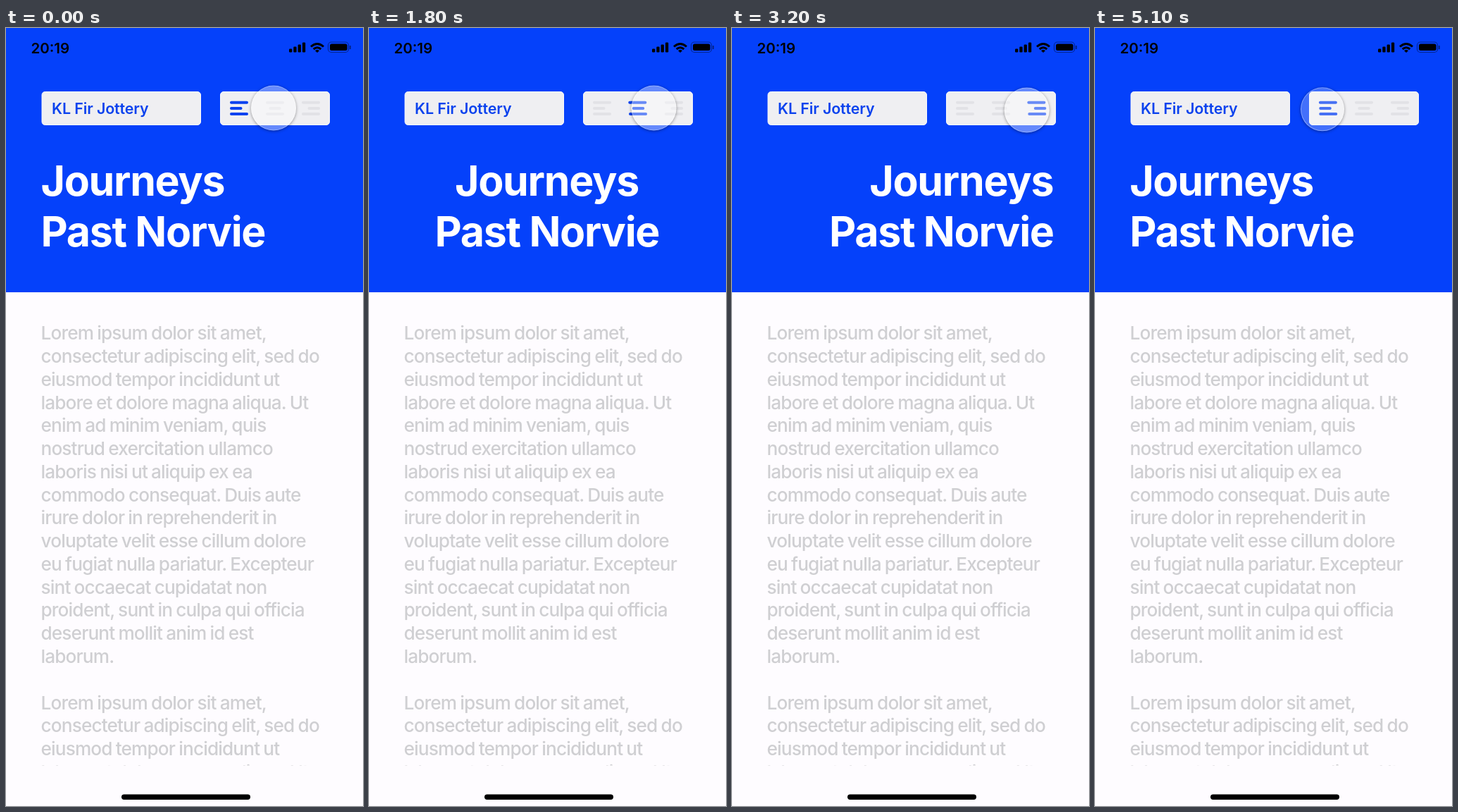
Recreate the animation shown at these times as an HTML page. Size 507x1104 px, loop 5.2 s.

```html
<!DOCTYPE html>
<html lang="en">
<head>
<meta charset="utf-8">
<title>Text alignment</title>
<style>
  html, body { margin: 0; width: 100%; height: 100%; overflow: hidden; background: #fefcff; }
  svg { position: absolute; left: 0; top: 0; }
  text { font-family: Inter, "Open Sans", sans-serif; font-optical-sizing: none; white-space: pre; }
  .title { font-size: 59px; font-weight: 700; letter-spacing: -1.3px; fill: #fff; }
  .label { font-size: 21.4px; font-weight: 600; letter-spacing: -.1px; fill: #0a42ee; }
  .clock { font-size: 20.5px; font-weight: 600; }
  .body { font-size: 26.2px; font-weight: 500; letter-spacing: -.85px; word-spacing: -1px; fill: #cfcfd2; }
  .panel { fill: #efeff2; stroke: #f8f8fc; }
  #lens {
    position: absolute; left: 0; top: 0; box-sizing: border-box; border-radius: 50%;
    border: 1px solid rgba(255, 255, 255, .35); box-shadow: 0 1px 4px rgba(0, 0, 0, .4);
  }
</style>
</head>
<body>
<svg width="507" height="1104" viewBox="0 0 507 1104">
  <clipPath id="panelClip"><rect x="304" y="90" width="156" height="48" rx="5"/></clipPath>
  <clipPath id="bodyClip"><rect y="376" width="507" height="670.5"/></clipPath>
  <rect width="507" height="375" fill="#0541fa"/>

  <text class="clock" x="35.5" y="36">20:19</text>
  <g id="signal"></g>
  <g fill="none" stroke="#000" stroke-width="3">
    <path d="M433 26.5Q442 18.5 451 26.5M436.7 30Q442 25.5 447.3 30"/>
    <path d="M439 32.2Q442 30 445 32.2L442 35Z" fill="#000" stroke="none"/>
    <rect x="457.5" y="20" width="29" height="14.5" rx="4.5" stroke-width="1.2" opacity=".4"/>
    <path d="M488.8 25V30" stroke-width="2" opacity=".45"/>
  </g>
  <rect x="460" y="22.5" width="24.5" height="9.5" rx="2.5"/>

  <rect class="panel" x="51" y="90.5" width="225.5" height="47" rx="4.5"/>
  <text class="label" x="65" y="121.7">KL Fir Jottery</text>
  <rect class="panel" x="304.5" y="90.5" width="155" height="47" rx="4.5"/>
  <g id="icons" clip-path="url(#panelClip)"></g>

  <text class="title" y="238">Journeys</text>
  <text class="title" y="310">Past Norvie</text>

  <g id="body" clip-path="url(#bodyClip)"></g>
  <rect x="164" y="1087.5" width="183" height="7.5" rx="3.7"/>
</svg>
<div id="lens"></div>

<script>
const LOOP = 5200, STEP = 100;
const $ = id => document.getElementById(id);

function add(parent, tag, attrs, text = "") {
  const el = document.createElementNS("http://www.w3.org/2000/svg", tag);
  for (const name in attrs) el.setAttribute(name, attrs[name]);
  el.textContent = text;
  return parent.appendChild(el);
}

for (let i = 0; i < 4; i++) {
  const height = 5 + i * 3;
  add($("signal"), "rect", { x: 402 + i * 6.3, y: 34.5 - height, width: 4.3, height, rx: 1.2 });
}

const lorem = `Lorem ipsum dolor sit amet,
consectetur adipiscing elit, sed do
eiusmod tempor incididunt ut
labore et dolore magna aliqua. Ut
enim ad minim veniam, quis
nostrud exercitation ullamco
laboris nisi ut aliquip ex ea
commodo consequat. Duis aute
irure dolor in reprehenderit in
voluptate velit esse cillum dolore
eu fugiat nulla pariatur. Excepteur
sint occaecat cupidatat non
proident, sunt in culpa qui officia
deserunt mollit anim id est
laborum.`.split("\n");
[...lorem, "", ...lorem.slice(0, 4)].forEach((line, i) =>
  add($("body"), "text", { class: "body", x: 49.5, y: 442.2 + i * 32.77 }, line));

// Position of an item inside a span: 0 = left, 0.5 = centre, 1 = right.
const aligned = (left, right, width, k) => left + (right - left - width) * k;
const barWidths = [26, 17.5, 26];
const barX = (row, k) => aligned(318, 446, barWidths[row], k);
const addBar = (row, k, fill) => add($("icons"), "rect",
  { x: barX(row, k), y: 103.8 + row * 8.1, width: barWidths[row], height: 4, rx: 2, fill });

for (const k of [0, .5, 1]) barWidths.forEach((_, row) => addBar(row, k, "#e2e2e6"));
const bars = barWidths.map((_, row) => addBar(row, 0, "#0a42f0"));
const titles = [...document.querySelectorAll(".title")];
const titleWidths = titles.map(el => el.getComputedTextLength());

// Underdamped spring of unit mass, going from 0 to 1.
function spring(ms, stiffness) {
  if (ms <= 0) return 0;
  const t = ms / 1000, decay = 5, w = Math.sqrt(stiffness - decay * decay);
  return 1 - Math.exp(-decay * t) * (Math.cos(w * t) + decay / w * Math.sin(w * t));
}

const taps = [[950, .5], [2380, .5], [3890, -1]];
const alignment = (t, stiffness) =>
  taps.reduce((sum, [at, delta]) => sum + delta * spring(t - at, stiffness), 0);

// time, x, y, radius
const lensPath = [
  [0, 380, 113.5, 32], [850, 380, 113.5, 32], [950, 380, 113.5, 31],
  [1200, 380, 113.5, 31], [1300, 380, 113.5, 32], [1600, 381, 113.5, 32],
  [1700, 389, 113.5, 32], [1800, 404.5, 113.5, 32], [1950, 424, 115, 32],
  [2100, 437, 117, 32], [2300, 436, 118, 32], [2400, 436, 118, 31],
  [2850, 436, 118, 31], [2950, 435, 118, 32], [3200, 418.7, 116.5, 32],
  [3500, 410, 115, 32], [3600, 323, 115.3, 32], [3800, 323, 115.3, 32],
  [3900, 323, 115.3, 31], [LOOP, 323, 115.3, 31]
];

function lensAt(t) {
  const i = lensPath.findIndex(key => key[0] > t);
  const a = lensPath[i - 1], b = lensPath[i];
  const p = (t - a[0]) / (b[0] - a[0]);
  return a.map((v, n) => v + (b[n] - v) * p).slice(1);
}

const barStiffness = [80, 135, 64], titleStiffness = 100;

function draw() {
  const t = Math.floor((performance.now() % LOOP) / STEP) * STEP;
  bars.forEach((bar, row) => bar.setAttribute("x", barX(row, alignment(t, barStiffness[row]))));
  titles.forEach((el, i) =>
    el.setAttribute("x", aligned(49.5, 457.5, titleWidths[i], alignment(t, titleStiffness))));

  // Pressing makes the lens smaller and clearer.
  const [x, y, r] = lensAt(t), style = $("lens").style;
  style.width = style.height = 2 * r + "px";
  style.transform = `translate(${x - r}px, ${y - r}px)`;
  style.background = `rgba(255, 255, 255, ${.25 + (r - 31) * .14})`;
  requestAnimationFrame(draw);
}
draw();
</script>
</body>
</html>
```
